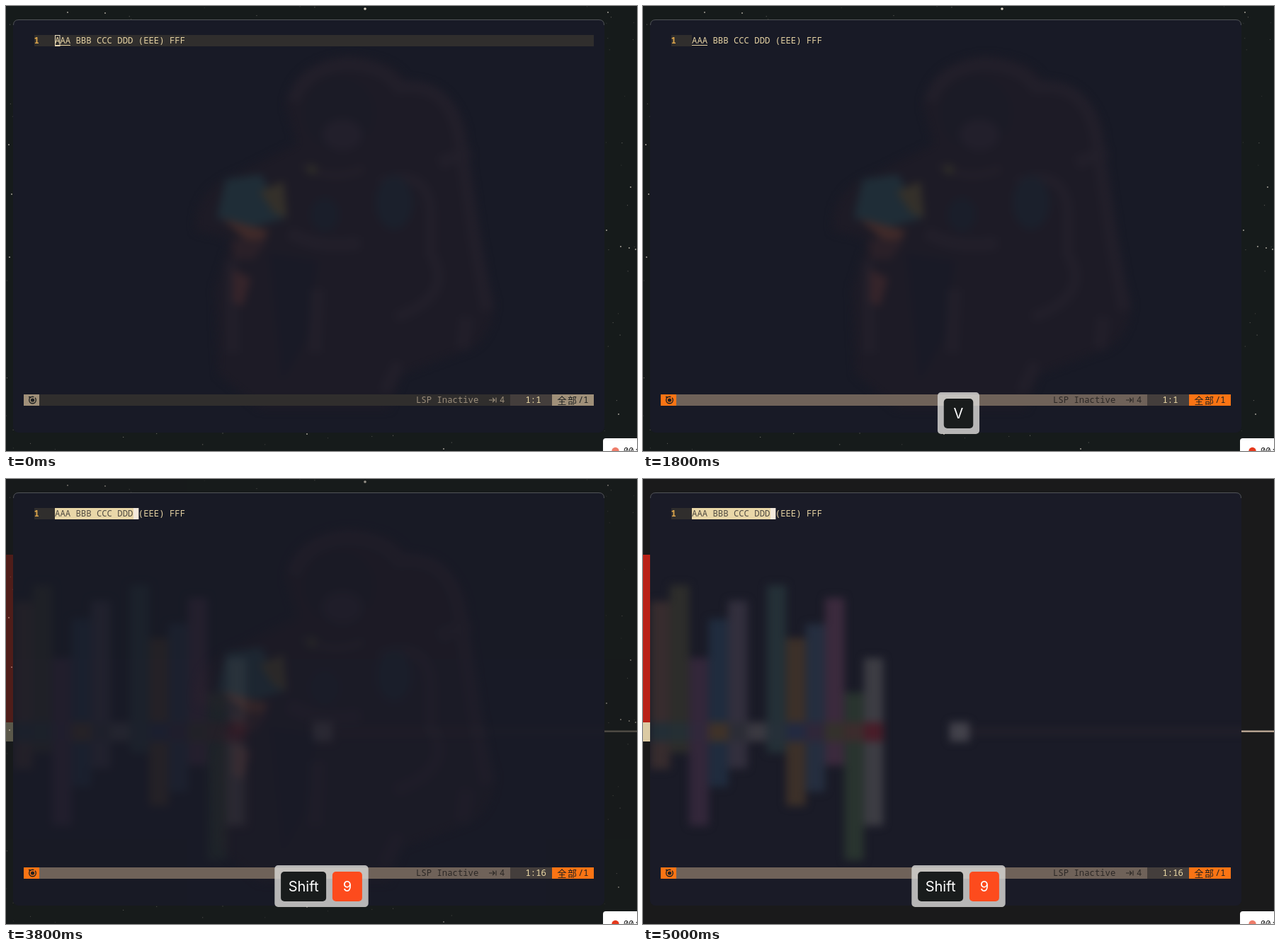
An HTML page for the animation above (5.1 s loop, 891 by 629 pixels).

```html
<!DOCTYPE html>
<html lang="en">
<head>
<meta charset="utf-8">
<title>Editor selection demo</title>
<style>
  html, body { margin: 0; width: 100%; height: 100%; overflow: hidden; background: #161b1b; }
  svg { display: block; }
  text { white-space: pre; font: 500 12.27px "Noto Sans Mono", "DejaVu Sans Mono", monospace; }
  .cjk { font: 500 13px "Noto Sans CJK SC", "Noto Sans CJK", sans-serif; }
  .key { font: 400 20px Inter, Roboto, sans-serif; fill: #fff; text-anchor: middle; }
</style>
</head>
<body>
<svg width="891" height="629" viewBox="0 0 891 629">
  <defs>
    <clipPath id="win"><rect x="10" y="19" width="835" height="584" rx="8"/></clipPath>
    <filter id="soft" filterUnits="userSpaceOnUse" x="0" y="0" width="891" height="629"
            color-interpolation-filters="sRGB"><feGaussianBlur stdDeviation="6"/></filter>
  </defs>

  <!-- desktop -->
  <rect width="891" height="629" fill="#161b1b"/>
  <g id="stars" fill="#d9d2c4"></g>
  <g class="fade">
    <rect width="891" height="629" fill="#1a1a1b"/>
    <rect y="107" width="12" height="237" fill="#ba2218"/>
    <rect y="344" width="12" height="27" fill="#dccba4"/>
    <rect x="840" y="355.5" width="51" height="2.3" fill="#c2ad9a"/>
  </g>

  <!-- translucent window with the blurred desktop behind it -->
  <g clip-path="url(#win)">
    <rect x="10" y="19" width="835" height="584" fill="#181a26"/>
    <g filter="url(#soft)" fill="#1d1b26">
      <path d="M395 140Q405 80 480 70Q545 72 565 105Q635 110 650 180L660 320L690 420
               Q685 480 640 490L560 520L540 570H360L300 520L295 400L318 330L268 318
               Q262 260 330 235L410 195Z"/>
      <path d="M372 350L440 360L425 470L390 530Z" fill="#191a26"/>
      <g fill="none" stroke="#221f2a" stroke-width="17">
        <path d="M405 135Q420 88 480 82Q535 84 555 115Q632 105 643 200L662 330L680 430"/>
        <path d="M528 250Q600 225 600 300V350Q635 410 550 440" stroke-width="14"/>
        <path d="M612 222L655 205M400 320Q440 345 500 335M318 360L320 490M440 400L436 490M555 505L535 545M650 440L645 485"/>
      </g>
      <ellipse cx="470" cy="152" rx="50" ry="52" fill="#1b1b26"/>
      <ellipse cx="475" cy="182" rx="28" ry="22" fill="#221f2b"/>
      <path d="M418 225Q460 250 505 230" fill="none" stroke="#231f29" stroke-width="9"/>
      <ellipse cx="548" cy="278" rx="26" ry="38" fill="#1b202c"/>
      <ellipse cx="450" cy="295" rx="20" ry="24" fill="#1a1e2a"/>
      <path d="M310 245L360 238L395 300L350 312L298 300Z" fill="#1f2d37"/>
      <path d="M358 262L392 248L397 300L378 292Z" fill="#34302a"/>
      <path d="M305 300L372 318L352 342Z" fill="#402a29"/>
      <path d="M318 330H370L350 358H322Z" fill="#2a2028"/>
      <path d="M320 372L346 385L334 425L320 418Z" fill="#35242a"/>
      <circle cx="432" cy="231" r="7" fill="#2e2d28"/>
    </g>
    <g class="fade">
      <rect x="10" y="19" width="835" height="584" fill="#1a1b27"/>
      <g id="bars" filter="url(#soft)"></g>
    </g>
  </g>
  <path d="M10.5 27Q10.5 19.5 18 19.5H837Q844.5 19.5 844.5 27" fill="none" stroke="#5b5e61" stroke-opacity=".85"/>

  <!-- buffer line -->
  <rect id="line" x="40" y="41" height="16" fill="#302e2d"/>
  <rect id="selection" x="69" y="41" width="111" height="16" fill="#e9d7a8"/>
  <rect id="cursor" y="41" width="7.4" height="16" fill="#f3e9dc"/>
  <rect id="hollow" x="69.5" y="41.5" width="6.5" height="15" fill="none" stroke="#e8dcc0"/>
  <text x="39.6" y="53" fill="#dea64c" style="font-weight:700">1</text>
  <text x="69" y="53" fill="#e6d3a4"><tspan id="first">A</tspan><tspan id="rest">AA BBB CCC DDD </tspan>(EEE) FFF</text>
  <path id="underline" d="M69 55.5H91" stroke="#e6d3a4"/>

  <!-- status line -->
  <rect id="status" x="25" y="549" width="805" height="16"/>
  <rect class="mode" x="25" y="549" width="22" height="16"/>
  <g fill="none" stroke="#1d2021" stroke-width="1.4">
    <circle cx="37.5" cy="557" r="4.8" stroke-dasharray="24 2"/>
    <circle cx="37.5" cy="557" r="2.6" fill="#1d2021" stroke="none"/>
    <path d="M32 552.5L35 553"/>
  </g>
  <g id="info">
    <text x="579" y="561">LSP Inactive</text>
    <text x="697" y="561">4</text>
    <path d="M682 557H690M687 554L690 557L687 560M692 553.5V560.5" fill="none" stroke-width="1.1"/>
  </g>
  <rect x="712" y="549" width="59" height="16" fill="#443e3c"/>
  <text id="position" x="733.5" y="561" fill="#f0dda8"></text>
  <rect class="mode" x="771" y="549" width="59" height="16"/>
  <g fill="#1d2021">
    <text class="cjk" x="778.5" y="561.5">全</text>
    <text class="cjk" x="793" y="561.5">部</text>
    <text x="808" y="561">/1</text>
  </g>

  <g id="keys"></g>

  <!-- recorder corner -->
  <rect x="843" y="611" width="60" height="40" rx="4" fill="#fff"/>
  <circle id="dot" cx="860.5" cy="629" r="5.2" fill="#e5391c"/>
  <text x="872" y="633" fill="#222">00:</text>
</svg>

<script>
const LOOP = 5100, STEP = 100, BLINK = 750;
const FOCUS = 400, VISUAL = 700, SHIFT = 2500, NINE = 3100;
const FADE_START = 3000, FADE_TIME = 2000;

const $ = id => document.getElementById(id);
const all = cls => document.querySelectorAll('.' + cls);
const set = (el, attrs) => { for (const k in attrs) el.setAttribute(k, attrs[k]); };
const show = (id, on) => { $(id).style.display = on ? '' : 'none'; };
const rect = (x, y, w, h, fill, rx = 0) =>
  `<rect x="${x}" y="${y}" width="${w}" height="${h}" rx="${rx}" fill="${fill}"/>`;

function drawStars() {
  let seed = 7;
  const rand = () => (seed = seed * 16807 % 2147483647) / 2147483647;
  const star = (x, y, r, o) => `<circle cx="${x}" cy="${y}" r="${r}" opacity="${o}"/>`;
  const bright = [[87, 9], [140, 10], [850, 9], [882, 256], [848, 317], [4, 196], [5, 355], [8, 266],
    [865, 577], [889, 344], [425, 605], [618, 626], [880, 342], [868, 340]];
  let out = star(507, 4, 1.8, 1);
  for (const [x, y] of bright) out += star(x, y, .9, .8);
  for (let i = 0; i < 350; i++) out += star(rand() * 891, rand() * 629, .6, .15 + rand() * .4);
  $('stars').innerHTML = out;
}

function drawBars() {
  const w = 27.4, mid = 344;
  const bars = [[173, '#372c2e'], [150, '#2d2d2b'], [253, '#33273a'], [198, '#202c3e'], [172, '#322f3d'], null,
    [150, '#243037'], [225, '#3c3029'], [205, '#252e3f'], [168, '#3b2a3d'], [302, '#29342f'], [253, '#3c3c43']];
  const band = ['#232e36', '#252f34', '#31283b', '#3f3229', '#2c2d36', '#3a3941',
    '#263039', '#232a40', '#2f2739', '#34312c', '#3c2c2d', '#481d29'];
  let out = rect(460, 355, 400, 4, '#2c252e');
  bars.forEach((b, i) => { if (b) out += rect(10.5 + i * w, b[0], w, 237, b[1]); });
  band.forEach((c, i) => { out += rect(10.5 + i * w, mid, w, 27, c); });
  $('bars').innerHTML = out + rect(433, mid, 28, 27, '#43424b');
}

const KEYS = {
  V: { width: 41.5, fill: '#191c1c' },
  Shift: { width: 64, fill: '#191c1c' },
  9: { width: 42, fill: '#fd4b1d' },
};

function drawKeys(names) {
  const gap = 8.8;
  const total = names.reduce((sum, n) => sum + KEYS[n].width + gap, gap);
  let x = 445.5 - total / 2;
  let out = names.length ? rect(x, 546, total, 59, 'rgba(214,212,210,.84)', 5) : '';
  for (const name of names) {
    const { width, fill } = KEYS[name];
    x += gap;
    out += rect(x, 555, width, 42, fill, 5) +
      `<text class="key" x="${x + width / 2}" y="583">${name}</text>`;
    x += width;
  }
  $('keys').innerHTML = out;
}

function render(t) {
  const visual = t >= VISUAL, selected = t >= NINE;
  const lastKey = selected ? NINE : visual ? VISUAL : FOCUS;
  const cursorOn = t >= FOCUS && Math.floor((t - lastKey) / BLINK) % 2 === 0;

  set($('line'), { width: visual ? 29 : 790 });
  show('hollow', t < FOCUS);
  show('cursor', cursorOn);
  set($('cursor'), { x: selected ? 180 : 69 });
  show('selection', selected);
  show('underline', !selected);
  const ink = selected ? '#514b42' : '#e6d3a4';
  set($('first'), { fill: cursorOn && !selected ? '#1d2021' : ink });
  set($('rest'), { fill: ink });

  set($('status'), { fill: visual ? '#6f6259' : '#302e2d' });
  const info = visual ? '#2b2725' : '#9d8f7c';
  set($('info'), { fill: info, stroke: 'none' });
  set($('info').querySelector('path'), { stroke: info });
  all('mode').forEach(el => set(el, { fill: visual ? '#fb7414' : '#a09079' }));
  $('position').textContent = selected ? '1:16' : '1:1';

  drawKeys(selected ? ['Shift', '9'] : t >= SHIFT ? ['Shift'] : visual ? ['V'] : []);

  const p = Math.min(1, Math.max(0, (t - FADE_START) / FADE_TIME));
  all('fade').forEach(el => set(el, { opacity: (1 - Math.cos(Math.PI * p)) / 2 }));
  set($('dot'), { opacity: .5 + .5 * Math.cos(2 * Math.PI * (t - 800) / 1000) });
}

drawStars();
drawBars();
const start = performance.now();
let last = -1;
function tick() {
  const t = Math.floor((performance.now() - start) % LOOP / STEP) * STEP;
  if (t !== last) render(last = t);
  requestAnimationFrame(tick);
}
tick();
</script>
</body>
</html>
```
